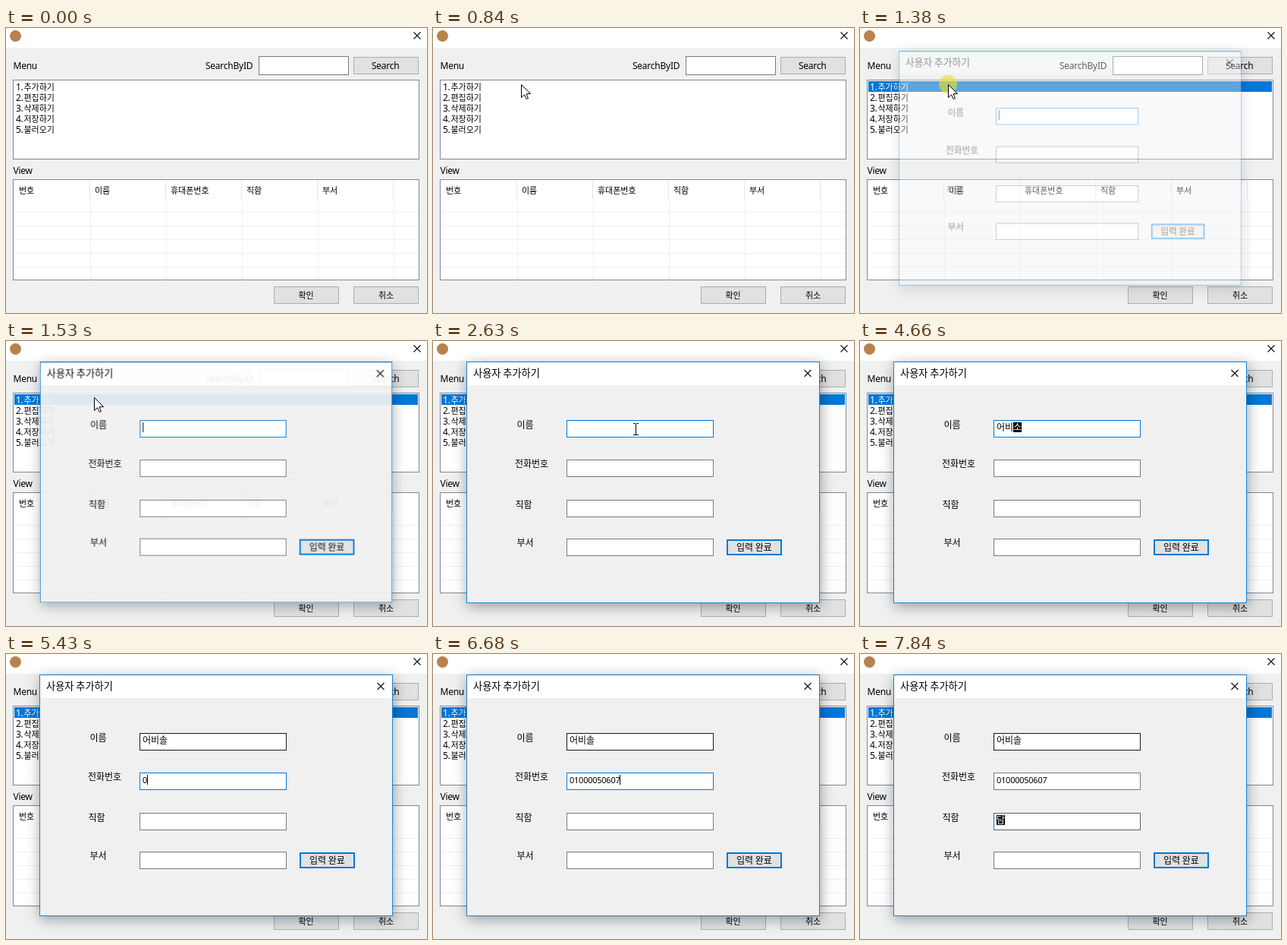
An HTML page with a canvas that plays this animation: 555 px wide and 375 px high, repeating every 8000 ms.

```html
<!DOCTYPE html>
<html lang="ko">
<head>
<meta charset="utf-8">
<title>사용자 추가하기</title>
<style>
html, body { margin: 0; width: 100%; height: 100%; overflow: hidden; background: #eff0f0; }
canvas { display: block; }
</style>
</head>
<body>
<canvas id="stage" width="555" height="375"></canvas>
<script>
const LOOP = 8000, STEP = 76.6;
const LATIN = '"Noto Sans", "Open Sans", sans-serif';
const HANGUL = '"Noto Sans CJK KR", "Noto Sans CJK JP", "Noto Sans CJK", sans-serif';
const BLUE = [0, 120, 215], GRAY = [122, 122, 122], DARK = [23, 23, 23];
const FIELD_Y = [104, 156, 209, 260];
const DIALOG = { x: 44, y: 27, w: 466, h: 318 };

const stage = document.getElementById('stage').getContext('2d');
const layer = document.createElement('canvas');
layer.width = DIALOG.w;
layer.height = DIALOG.h;
const dialogCtx = layer.getContext('2d');
let g = stage;

const rgb = c => `rgb(${c.map(Math.round).join()})`;
const clamp = v => Math.max(0, Math.min(1, v));
const mix = (a, b, p) => a.map((v, i) => v + (b[i] - v) * p);

function ticks(t, start, count) {
  return clamp(Math.floor((t - start) / STEP + 0.1) / count);
}

function rect(x, y, w, h, fill) {
  g.fillStyle = fill;
  g.fillRect(x, y, w, h);
}
function box(x, y, w, h, fill, border, line = 1) {
  rect(x, y, w, h, border);
  rect(x + line, y + line, w - 2 * line, h - 2 * line, fill);
}
function write(text, x, base, font, color, spacing) {
  g.font = font;
  g.letterSpacing = spacing;
  g.fillStyle = color;
  g.fillText(text, x, base);
  return g.measureText(text).width;
}
const latin = (text, x, base, size = 12, color = '#000') =>
  write(text, x, base, `${size}px ${LATIN}`, color, '-0.25px');
const hangul = (text, x, mid, size = 12, color = '#000') =>
  write(text, x, mid + size * 0.41, `${size}px ${HANGUL}`, color, '0px');

function cross(x, y, size) {
  g.strokeStyle = '#111';
  g.lineWidth = 1.2;
  g.beginPath();
  g.moveTo(x, y);
  g.lineTo(x + size, y + size);
  g.moveTo(x + size, y);
  g.lineTo(x, y + size);
  g.stroke();
}
function disc(x, y, r, fill) {
  g.fillStyle = fill;
  g.beginPath();
  g.arc(x, y, r, 0, 7);
  g.fill();
}

function drawMain(selected) {
  rect(0, 0, 555, 375, '#eff0f0');
  rect(0, 0, 555, 26, '#fff');
  disc(12.5, 10.5, 7.5, '#b9824c');
  cross(537.5, 5.5, 9);

  latin('Menu', 9.5, 54);
  latin('SearchByID', 263, 54);
  box(333, 37, 119, 25, '#fff', '#7a7a7a');
  box(458, 38, 86, 23, '#e1e1e1', '#adadad');
  latin('Search', 482, 54);

  box(9, 68, 536, 105, '#fff', '#828790');
  if (selected) rect(11, 70, 532, 14, rgb(BLUE));
  ['추가하기', '편집하기', '삭제하기', '저장하기', '불러오기'].forEach((name, i) => {
    const mid = 77 + i * 14, color = selected && !i ? '#fff' : '#000';
    latin(`${i + 1}.`, 13, mid + 5, 12, color);
    hangul(name, 23.5, mid, 11, color);
  });

  latin('View', 9.5, 192);
  box(9, 199, 536, 133, '#fff', '#828790');
  for (let i = 0; i < 5; i++) {
    rect(110 + i * 100, 201, 1, 24, '#e5e5e5');
    rect(111 + i * 100, 225, 1, 106, '#f0f0f0');
    rect(11, 242 + i * 18, 533, 1, '#f0f0f0');
  }
  ['번호', '이름', '휴대폰번호', '직함', '부서'].forEach((name, i) =>
    hangul(name, 17 + i * 100, 213, 11));

  box(353, 340, 86, 23, '#e1e1e1', '#adadad');
  box(458, 340, 86, 23, '#e1e1e1', '#adadad');
  hangul('확인', 385.5, 351, 11);
  hangul('취소', 491, 351, 11);
}

// Entries: [time, settled text, syllable being composed]
const NAME = [
  [0, ''], [2860, 'd'], [2930, 'dj'], [3100, 'djq'], [3170, 'djql'],
  [3340, 'djq'], [3490, 'dj'], [3720, 'd'], [3890, ''],
  [4040, '', 'ㅇ'], [4190, '', '어'], [4360, '어', 'ㅂ'], [4510, '어', '비'],
  [4590, '어비', 'ㅅ'], [4660, '어비', '소'], [4890, '어비', '솔'], [4970, '어비솔']
];
const PHONE = '01000050607';
const PHONE_KEYS = [5430, 5510, 5590, 5820, 5890, 6060, 6210, 6360, 6530, 6610, 6680];
const ROLE = [[0, ''], [7770, '', '다'], [7840, '', '담']];
const latest = (list, t) => list.filter(e => e[0] <= t).pop();

function entry(text, composing, y, caret) {
  let x = 180;
  if (/^[a-z]/.test(text)) x = 179.5 + latin(text, 179.5, y + 14);
  else if (/^\d/.test(text)) x += latin(text, 180, y + 14, 11);
  else if (text) x += hangul(text, 180, y + 9);
  x = Math.floor(x);
  if (composing) {
    rect(x, y + 3, 11, 13, '#000');
    hangul(composing, x, y + 9, 12, '#fff');
  } else if (caret) {
    rect(x, y + 3, 1, 13, '#000');
  }
}

function drawDialog(t) {
  g = dialogCtx;
  g.setTransform(1, 0, 0, 1, -DIALOG.x, -DIALOG.y);
  box(DIALOG.x, DIALOG.y, DIALOG.w, DIALOG.h, '#f0f0f0', '#1883d7');
  rect(45, 28, 464, 30, '#fff');
  hangul('사용자 추가하기', 53, 42, 13.2);
  cross(489.5, 38, 9);

  hangul('이름', 110.5, 110);
  hangul('전화번호', 108, 161.5);
  hangul('직함', 108.5, 215);
  hangul('부서', 110.5, 265.5);

  const toPhone = ticks(t, 4970, 3), toRole = ticks(t, 7140, 3);
  const borders = [
    mix(BLUE, DARK, toPhone),
    mix(mix(GRAY, BLUE, toPhone), GRAY, toRole),
    mix(GRAY, [90, 94, 100], toRole),
    GRAY
  ];
  FIELD_Y.forEach((y, i) => box(176, y, 194, 23, '#fff', rgb(borders[i])));
  if (toRole) rect(176, 209, 1, 23, rgb(mix(GRAY, BLUE, toRole)));

  const focus = t < 4970 ? 0 : t < 7140 ? 1 : 2;
  const [, name, part] = latest(NAME, t);
  const [, role, rolePart] = latest(ROLE, t);
  const digits = PHONE.slice(0, PHONE_KEYS.filter(k => k <= t).length);
  const blinkOff = t >= 2630 && t < 2860;
  entry(name, part, FIELD_Y[0], focus === 0 && !blinkOff);
  entry(digits, '', FIELD_Y[1], focus === 1);
  entry(role, rolePart, FIELD_Y[2], focus === 2);

  box(387, 261, 73, 21, '#e1e1e1', rgb(BLUE), 2);
  hangul('입력 완료', 400, 271);
  g = stage;
}

// The shadow only falls outside the window, even while it is translucent.
function dropShadow(x, y, w, h) {
  g.save();
  g.beginPath();
  g.rect(0, 0, 555, 375);
  g.rect(x, y, w, h);
  g.clip('evenodd');
  g.shadowColor = 'rgba(0,0,0,0.36)';
  g.shadowBlur = 17;
  g.shadowOffsetX = 1;
  g.shadowOffsetY = 4;
  rect(x, y, w, h, '#1883d7');
  g.restore();
}

function showDialog(t) {
  const i = Math.round(ticks(t, 1380, 3) * 3);
  const scale = [0.97, 0.988, 0.997, 1][i];
  const w = DIALOG.w * scale, h = DIALOG.h * scale;
  const x = DIALOG.x + (DIALOG.w - w) / 2;
  const y = DIALOG.y + (DIALOG.h - h) / 2 - (1 - scale) * 45;
  g.save();
  g.globalAlpha = [0.38, 0.72, 0.93, 1][i];
  dropShadow(x, y, w, h);
  g.drawImage(layer, x, y, w, h);
  g.restore();
}

function arrow(x, y) {
  g.beginPath();
  [[0, 0], [0, 17], [4, 13.3], [6.7, 19], [9, 18], [6.5, 12.3], [12, 12]]
    .forEach(([dx, dy]) => g.lineTo(x + 0.5 + dx, y + 0.5 + dy));
  g.closePath();
  g.fillStyle = '#fff';
  g.fill();
  g.strokeStyle = '#000';
  g.lineWidth = 1;
  g.stroke();
}
function ibeam(x, y) {
  rect(x, y - 7, 1, 15, '#000');
  for (const dy of [-8, 7]) {
    rect(x - 3, y + dy, 3, 1, '#000');
    rect(x + 1, y + dy, 3, 1, '#000');
  }
}

function drawPointer(t) {
  if (t < 380 || t >= 2860) return;
  if (t < 1610) {
    const p = ticks(t, 380, 6), e = p * p * (3 - 2 * p);
    arrow(Math.round(499 - 383 * e), Math.round(338 - 264 * e));
  } else if (t < 1910) {
    const p = (ticks(t, 1610, 4) * 4 + 1) / 5;
    arrow(Math.round(116 + 141 * p), Math.round(74 + 37 * p));
  } else if (t < 2080) ibeam(257, 111);
  else if (t < 2150) ibeam(271, 118);
  else ibeam(267, 116);
}

function draw(t) {
  drawMain(t >= 1150);
  if (t >= 1380) {
    drawDialog(t);
    showDialog(t);
  }
  if (t >= 1070 && t < 1460) disc(116, 74, 12, 'rgba(238,222,40,0.62)');
  drawPointer(t);
}

const begin = performance.now();
function frame() {
  draw((performance.now() - begin) % LOOP);
  requestAnimationFrame(frame);
}
frame();
</script>
</body>
</html>
```
